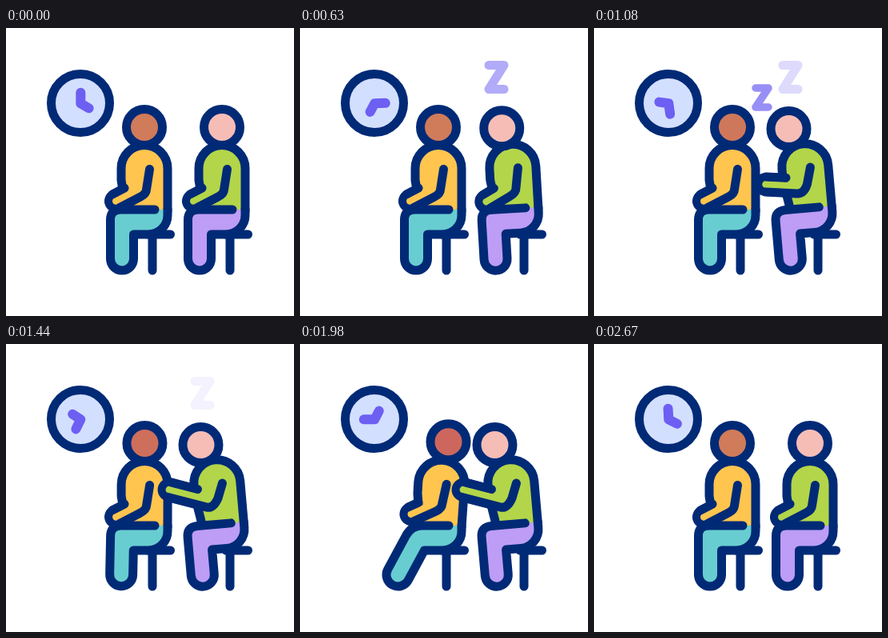
Write an HTML page that moves like this. It is 360 px wide and 360 px high and loops after 2700 ms.

```html
<!DOCTYPE html>
<html lang="en">
<head>
<meta charset="utf-8">
<title>Waiting room</title>
<style>
html, body { margin: 0; width: 100%; height: 100%; overflow: hidden; background: #fff; }
svg { display: block; width: 100vw; height: 100vh; }
.line { fill: none; stroke: #012a76; stroke-width: 11; stroke-linecap: round; stroke-linejoin: round; }
.mark { fill: none; stroke: #6c5ff2; stroke-linecap: round; stroke-linejoin: round; }
</style>
</head>
<body>
<svg id="stage" viewBox="0 0 360 360"></svg>
<script>
const LOOP = 2700;
const stage = document.getElementById('stage');

function add(parent, tag, attrs) {
  const el = document.createElementNS('http://www.w3.org/2000/svg', tag);
  for (const k in attrs) el.setAttribute(k, attrs[k]);
  parent.appendChild(el);
  return el;
}
const set = (el, k, v) => el.setAttribute(k, v);
const mix = (a, b, p) => a + (b - a) * p;
const mixPt = (a, b, p) => [mix(a[0], b[0], p), mix(a[1], b[1], p)];
const ramp = (t, a, b) => Math.min(1, Math.max(0, (t - a) / (b - a)));
const ease = (t, a, b) => { const p = ramp(t, a, b); return p * p * (3 - 2 * p); };
const pt = p => p[0].toFixed(2) + ',' + p[1].toFixed(2);

function keyed(t, keys, curve) {
  for (let i = 1; i < keys.length; i++) {
    const [t0, v0] = keys[i - 1], [t1, v1] = keys[i];
    if (t <= t1) return mix(v0, v1, curve(t, t0, t1));
  }
  return keys[keys.length - 1][1];
}

function turn([x, y], deg, [cx, cy]) {
  const a = deg * Math.PI / 180, c = Math.cos(a), s = Math.sin(a);
  return [cx + (x - cx) * c - (y - cy) * s, cy + (x - cx) * s + (y - cy) * c];
}

// Clock
add(stage, 'circle', { cx: 93, cy: 94, r: 36.5, class: 'line', style: 'fill:#d3dfff' });
const hands = add(stage, 'path', { class: 'mark', 'stroke-width': 12 });

// Figures
function makePerson(dx, shirt, trousers, skin) {
  const root = add(stage, 'g', { transform: `translate(${dx} 0)` });
  add(root, 'path', { class: 'line', d: 'M178,258H205.5M183,258V303' });
  const body = add(root, 'g', {});
  return {
    body,
    sleeve: add(body, 'path', { class: 'line', style: 'stroke-width:29' }),
    torso: add(body, 'path', { class: 'line', style: 'fill:' + shirt }),
    legs: add(body, 'path', { class: 'line', style: 'fill:' + trousers }),
    arm: add(body, 'path', { class: 'line', style: `stroke:${shirt};stroke-width:9` }),
    elbow: add(body, 'path', { class: 'line' }),
    head: add(root, 'circle', { class: 'line', r: 22.5, style: 'fill:' + skin })
  };
}

const HAND = [137.5, 216.3], ELBOW = [163, 203], FOOT = [145, 288.5], HIP = [202, 240];

function pose(p, { head, lean = 0, hand = HAND, elbow = ELBOW, foot = FOOT, slope = 0 }) {
  const up = (x, y) => turn([x, y], lean, HIP);
  set(p.torso, 'd', `M150,227L${pt(up(144, 190))}L${pt(up(144, 175.5))}` +
    `A29,29 0 0 1 ${pt(up(202, 175.5))}L202,229`);

  // Shin edges meet the thigh lines at y 227 and y 258.
  const w = 14.5, len = Math.hypot(slope, 1);
  const n = [w / len, w * slope / len];
  const left = [foot[0] - n[0], foot[1] - n[1]];
  const right = [foot[0] + n[0], foot[1] + n[1]];
  const kneeAt = (q, y) => [q[0] + slope * (q[1] - y), y];
  const knee = kneeAt(left, 227), bend = kneeAt(right, 258);
  const below = kneeAt(left, 240);
  set(p.legs, 'd', `M186,227L${pt([knee[0] + 13, 227])}Q${pt(knee)} ${pt(below)}L${pt(left)}` +
    `A${w},${w} 0 0 0 ${pt(right)}L${pt(bend)}L178,258A24,24 0 0 0 202,234V227`);

  // Forearm edges run parallel to the line from elbow to hand.
  const h = up(...hand), e = up(...elbow);
  const d = Math.hypot(h[0] - e[0], h[1] - e[1]);
  const ux = (h[0] - e[0]) / d, uy = (h[1] - e[1]) / d;
  const edge = (q, side, along) => [q[0] + uy * side + ux * along, q[1] - ux * side + uy * along];
  const fore = `M${pt(e)}L${pt(h)}`;
  set(p.sleeve, 'd', fore);
  set(p.arm, 'd', fore);
  const top = edge(h, -9.5, 0);
  const chest = [148, top[1] + (148 - top[0]) * uy / ux];
  set(p.elbow, 'd', `M${pt(up(179.5, 176.5))}L${pt([e[0] + 12.5, e[1] - 1])}` +
    `Q${pt(edge(e, 9.5, -9))} ${pt(edge(e, 9.5, 0))}L${pt(edge(h, 9.5, 0))}` +
    `M${pt(top)}L${pt(chest)}`);

  set(p.head, 'cx', head[0]);
  set(p.head, 'cy', head[1]);
}

const waiter = makePerson(0, '#ffc54e', '#68cdd0', '#d07b59');
const sleeper = makePerson(97, '#b3d549', '#bd9df6', '#f6bdb6');

// Snores
const bigZ = add(stage, 'path', { class: 'mark', 'stroke-width': 11, d: 'M236,46.5H255L236,76.5H255' });
const smallZ = add(stage, 'path', { class: 'mark', 'stroke-width': 9.5, d: 'M202,75H218L202,99H218' });

const MINUTE = [[0, 0], [630, 88], [1080, 172], [1440, 206], [1980, 270], [2370, 325], [2700, 360]];
const HOUR = [[0, 120], [630, 208], [1080, 278], [1440, 303], [1980, 387], [2370, 448], [2700, 480]];
const WAITER_Y = [[0, 124], [1380, 124], [1900, 122.5], [2370, 119.5], [2660, 124]];
const SLEEPER_Y = [[0, 124], [200, 124], [900, 126], [2050, 126], [2370, 122.3], [2660, 124]];

function draw(t) {
  const hub = [93.3, 94.3];
  const tip = (keys, len) => pt(turn([hub[0], hub[1] - len], keyed(t, keys, ramp), hub));
  set(hands, 'd', `M${tip(MINUTE, 13.5)}L${pt(hub)}L${tip(HOUR, 12)}`);

  const jolt = ease(t, 1380, 1900) - ease(t, 2390, 2660);
  pose(waiter, {
    head: [173 + 12.5 * jolt, keyed(t, WAITER_Y, ease)],
    lean: 3.3 * jolt,
    foot: mixPt(FOOT, [122.5, 288.5], jolt),
    slope: 0.54 * jolt
  });
  const blush = ease(t, 700, 2000) - ease(t, 2390, 2660);
  waiter.head.style.fill = `rgb(${mix(208, 205, blush)},${mix(123, 103, blush)},${mix(89, 93, blush)})`;

  const wake = ease(t, 2050, 2490);
  const doze = ease(t, 200, 900) - wake;
  const reach = ease(t, 750, 1320) - wake;
  set(sleeper.body, 'transform', `translate(${doze} ${-3 * doze}) rotate(${-5 * doze} 183 258)`);
  pose(sleeper, {
    head: [173 - 26.5 * doze, keyed(t, SLEEPER_Y, ease)],
    hand: mixPt(HAND, [112.7, 178.7], reach),
    elbow: mixPt(ELBOW, [160, 195.5], reach)
  });

  const s = t < 1500 ? t % 750 : 0;
  set(bigZ, 'opacity', 0.9 * (ramp(s, 300, 420) - ramp(s, 580, 702)));
  set(smallZ, 'opacity', 0.9 * (ramp(s, 230, 360) - ramp(s, 470, 590)));
}

function tick() {
  draw(performance.now() % LOOP);
  requestAnimationFrame(tick);
}
tick();
</script>
</body>
</html>
```
